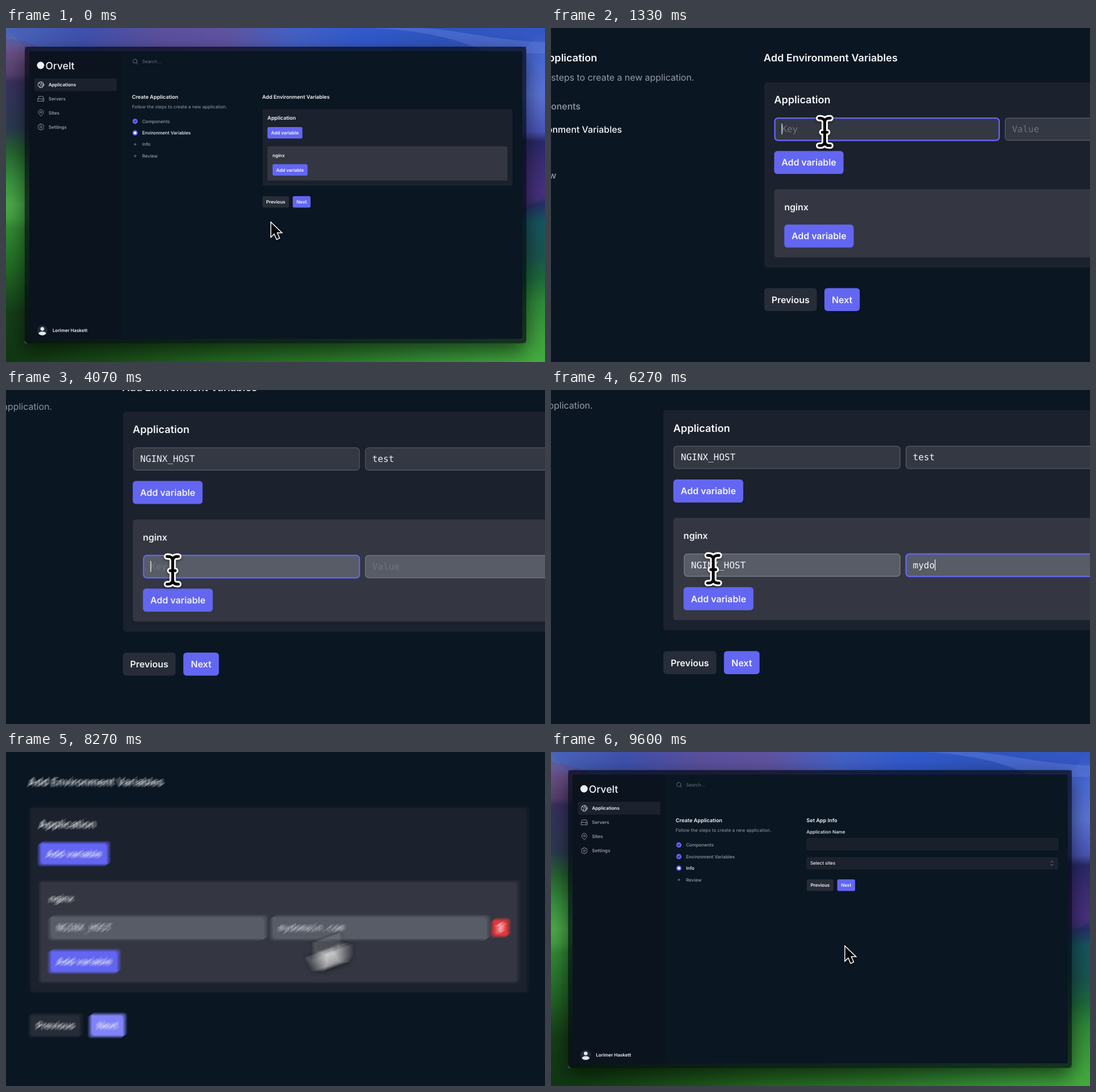
Recreate the animation shown at these times as an HTML page with a canvas. Size 950 by 590 pixels, loop 9.67 s.

```html
<!DOCTYPE html>
<html lang="en">
<head>
<meta charset="utf-8">
<title>Create application</title>
<style>
  html, body { margin: 0; width: 100%; height: 100%; overflow: hidden; background: #0a1622; }
  canvas { display: block; width: 950px; height: 590px; }
</style>
</head>
<body>
<canvas id="stage" width="950" height="590"></canvas>
<script>
const W = 950, H = 590, LOOP = 9670;
const SANS = 'Inter, sans-serif', MONO = '"DejaVu Sans Mono", monospace';
const INDIGO = '#6366f1', INDIGO_HOVER = '#8184f8', WHITE = '#f5f6f8', GREY = '#969ca7', PAGE = '#0a1622';

const APP_ROW = 860, NGINX_ROW = 3620, DELETE_CLICK = 7690, NEXT_CLICK = 8600, ROW = 29.6;

const makeCanvas = () => Object.assign(document.createElement('canvas'), { width: W, height: H });
const stage = document.getElementById('stage').getContext('2d');
const buffer = makeCanvas();
const g = buffer.getContext('2d');
g.textRendering = 'geometricPrecision';
g.lineCap = 'round';

// ---------- motion ----------

// Critically damped approach from 0 to 1.
const settle = x => x <= 0 ? 0 : 1 - (1 + x) * Math.exp(-x);

function follow(t, start, steps) {
  let value = start, previous = start;
  for (const [begin, target, rate] of steps) {
    value += (target - previous) * settle((t - begin) / 1000 * rate);
    previous = target;
  }
  return value;
}

function camera(t) {
  const scale = follow(t, 1, [[350, 2, 6.3], [8650, 1, 8]]);
  const focusX = follow(t, 529.3, [[3370, 706, 7], [7150, 940, 7], [8097, 720, 7]]);
  const focusY = follow(t, 191.5, [[3370, 251, 7], [7150, 135, 7], [8097, 295, 7]]);
  return { scale, x: focusX * (1 - scale), y: focusY * (1 - scale) };
}

const pointer = t => ({
  x: follow(t, 466, [[100, 505.7, 8], [3090, 496, 8], [7100, 876.5, 8], [8080, 518, 8]]),
  y: follow(t, 341, [[100, 187.4, 8], [3090, 283.8, 8], [7100, 190, 8], [8080, 340.5, 8]])
});

// Pointer shape over time, with the button under it.
const SHAPES = [
  [0, 'arrow'], [480, 'hand', 'addApp'], [APP_ROW, 'beam'], [3100, 'arrow'],
  [3420, 'hand', 'addNginx'], [NGINX_ROW, 'beam'], [7160, 'arrow'],
  [7480, 'hand', 'delete'], [7750, 'arrow'], [8160, 'hand', 'next'], [NEXT_CLICK, 'arrow']
];
const latest = (list, t) => list.filter(item => item[0] <= t).pop();

// Fields: focus time, first key time, ms per key.
const FIELDS = {
  appKey: { focus: APP_ROW, start: 1450, pace: 75, text: 'NGINX_HOST', hint: 'Key' },
  appValue: { focus: 2300, start: 2400, pace: 100, text: 'test', hint: 'Value' },
  nginxKey: { focus: NGINX_ROW, start: 4400, pace: 75, text: 'NGINX_HOST', hint: 'Key' },
  nginxValue: { focus: 5500, start: 6000, pace: 80, text: 'mydomain.com', hint: 'Value' }
};

function focusedField(t) {
  if (t >= DELETE_CLICK) return null;
  return Object.values(FIELDS).filter(f => f.focus <= t).pop();
}

// ---------- drawing helpers ----------

function box(x, y, w, h, r, fill, stroke, line = 0.6) {
  g.beginPath();
  g.roundRect(x, y, w, h, r);
  if (fill) { g.fillStyle = fill; g.fill(); }
  if (stroke) { g.strokeStyle = stroke; g.lineWidth = line; g.stroke(); }
}

function label(text, x, y, { size = 8, weight = 500, color = WHITE, family = SANS, align = 'left' } = {}) {
  g.font = `${weight} ${size}px ${family}`;
  g.fillStyle = color;
  g.textAlign = align;
  g.fillText(text, x, y + size * 0.36);
}

function disc(x, y, r, fill) {
  g.beginPath();
  g.arc(x, y, r, 0, Math.PI * 2);
  g.fillStyle = fill;
  g.fill();
}

function line(path, color, width = 0.9) {
  g.strokeStyle = color;
  g.lineWidth = width;
  g.stroke(path);
}

const heading = (text, x, y) => label(text, x, y, { size: 9.1, weight: 600 });

function button(text, x, y, w, fill) {
  box(x, y, w, 20.4, 2.8, fill);
  label(text, x + w / 2, y + 10.3, { weight: 600, align: 'center' });
}

function at(x, y, draw) {
  g.save();
  g.translate(x, y);
  draw();
  g.restore();
}

const ICONS = {
  globe: new Path2D('M5.2 0A5.2 5.2 0 1 1-5.2 0A5.2 5.2 0 1 1 5.2 0M-4-3L-1-2L0 0L-2 2L-1 5M1-5L1-2L4-1M5 1L2 1L2 4'),
  server: new Path2D('M-5.3 0L-3.6-4.3H3.6L5.3 0V4.3H-5.3ZM-5.3 0H5.3M2 2.2H3.6'),
  pin: new Path2D('M0 5.6C-3 2.5-4.5 1-4.5-1.2A4.5 4.5 0 0 1 4.5-1.2C4.5 1 3 2.5 0 5.6M1.6-1.2A1.6 1.6 0 1 1-1.6-1.2A1.6 1.6 0 1 1 1.6-1.2'),
  gear: new Path2D('M-1.2-5.3H1.2L1.7-3.8L3.9-4L5.2-1.6L4 0L5.2 1.6L3.9 4L1.7 3.8L1.2 5.3H-1.2L-1.7 3.8L-3.9 4L-5.2 1.6L-4 0L-5.2-1.6L-3.9-4L-1.7-3.8ZM1.7 0A1.7 1.7 0 1 1-1.7 0A1.7 1.7 0 1 1 1.7 0'),
  search: new Path2D('M3-.7A3.6 3.6 0 1 1-4.2-.7A3.6 3.6 0 1 1 3-.7M2 2L4.6 4.6'),
  check: new Path2D('M-1.9.1L-.6 1.5L1.9-1.6'),
  chevrons: new Path2D('M-2-2L0-4L2-2M-2 2L0 4L2 2'),
  trash: new Path2D('M-3-2.5H3M-1-3.5H1M-2.3-2.5L-1.9 3.5H1.9L2.3-2.5M-.7-1V2M.7-1V2')
};

const icon = (name, x, y, color, width) => at(x, y, () => line(ICONS[name], color, width));

// ---------- wallpaper ----------

const wallpaper = (() => {
  const canvas = makeCanvas(), c = canvas.getContext('2d');
  const strip = (points, x1, y1, stops) => {
    const gradient = c.createLinearGradient(0, 0, x1, y1);
    stops.split(' ').forEach(stop => {
      const [position, color] = stop.split('#');
      gradient.addColorStop(position / 100, '#' + color);
    });
    c.fillStyle = gradient;
    c.fill(new Path2D(points));
  };
  strip('M0 0H475V590H0Z', 0, H, '0#4a64b8 5#5768b2 8#654d82 14#57416f 16#38315f 30#2a3a50 37#25652f 46#3a9440 53#4cab49 57#43a042 60#328a34 72#226a26 85#153f18 100#103612');
  strip('M475 0H950V590H475Z', 0, H, '0#2f55c0 10#4a6ad4 20#5b74d6 31#4a55b5 34#2a2968 41#3a2c74 49#44307c 53#253066 58#17555f 68#1a5550 75#1c6a3c 82#2f8a38 92#3fa03e 100#45ad40');
  strip('M0 0H950L910 42H40Z', W, 0, '0#4a64b8 14#3e50ac 28#5a4f9c 41#5f53a0 53#4460c4 66#3159cc 80#2f55bd 100#3557c4');
  strip('M0 590L40 548H910L950 590Z', W, 0, '0#103612 20#1a5019 40#256a22 60#2c7c2a 80#38953a 100#45ad40');
  c.globalAlpha = 0.45;
  strip('M640 0C740 4 800 20 850 45H950V25C850 22 790 0 720 0Z', W, 0, '0#5577dd 100#6680e0');
  strip('M0 18C30 22 60 32 90 48H0Z', 100, 0, '0#724a78 100#4a3c80');
  strip('M900 200C925 210 940 230 950 245V300C930 310 915 316 900 318Z', 0, H, '30#2a2968 55#563488');
  c.globalAlpha = 1;
  c.shadowColor = 'rgba(0,0,0,.6)';
  c.shadowBlur = 34;
  c.shadowOffsetY = 14;
  c.save();
  c.beginPath();
  c.rect(0, 0, W, H);
  c.roundRect(33, 33, 884, 524, 7);
  c.clip('evenodd');
  c.fillRect(33, 33, 884, 524);
  c.restore();
  c.shadowColor = 'transparent';
  c.fillStyle = 'rgba(5,10,20,.74)';
  c.beginPath();
  c.roundRect(33, 33, 884, 524, 7);
  c.fill();
  return canvas;
})();

// ---------- interface ----------

function sidebar() {
  box(41, 41, 163, 508, [3, 0, 0, 3], '#0b131f');
  g.fillStyle = '#131c29';
  g.fillRect(204, 77, 706, 0.7);
  g.fillRect(203.6, 41, 0.5, 508);
  disc(61, 66, 6.4, '#eef0f3');
  label('Orvelt', 69.5, 66.2, { size: 17.6 });
  box(50, 89, 145, 22.5, 3, '#1b222e');
  [['globe', 'Applications'], ['server', 'Servers'], ['pin', 'Sites'], ['gear', 'Settings']].forEach(([name, text], i) => {
    const y = 100.2 + i * 24.9, active = i === 0;
    icon(name, 61.5, y, active ? '#e4e6ea' : GREY);
    label(text, 75, y, { weight: 600, color: active ? WHITE : GREY });
  });
  disc(64, 534, 9, '#222a37');
  g.save();
  g.beginPath();
  g.arc(64, 534, 9, 0, 7);
  g.clip();
  disc(64, 531.5, 3.3, '#e5e7eb');
  g.beginPath();
  g.ellipse(64, 541, 7.2, 4.8, 0, 0, 7);
  g.fill();
  g.restore();
  label('Lorimer Haskett', 82, 534, { weight: 600 });
  icon('search', 228, 59.3, '#727985');
  label('Search...', 240, 59.3, { weight: 400, color: '#6b7280' });
}

function progress(current) {
  heading('Create Application', 222, 121.7);
  label('Follow the steps to create a new application.', 222, 139, { weight: 400, color: GREY });
  ['Components', 'Environment Variables', 'Info', 'Review'].forEach((text, i) => {
    const y = 164.8 + i * 20.4;
    if (i > current) disc(227.5, y, 2.1, '#4e5664');
    else {
      disc(227.5, y, 4.6, INDIGO);
      if (i === current) disc(227.5, y, 2.3, '#fff');
      else icon('check', 227.5, y, PAGE, 1);
    }
    label(text, 240, y, { color: i === current ? WHITE : GREY });
  });
}

function input(field, x, y, w, nested, t) {
  const focused = focusedField(t) === field;
  const count = Math.max(0, Math.min(field.text.length, Math.floor((t - field.start) / field.pace) + 1));
  const shown = field.text.slice(0, count);
  const fill = nested ? '#575c66' : '#343843';
  box(x + 0.4, y + 0.3, w - 0.8, 19.8, 2.8, fill, focused ? INDIGO : nested ? '#7e838c' : '#5a606b', focused ? 1.2 : 0.6);
  const hintColor = nested ? '#737983' : '#6d727c';
  label(shown || field.hint, x + 6.4, y + 9.9, { weight: 400, family: MONO, color: shown ? WHITE : hintColor });
  if (!focused) return;
  const lastKey = count ? field.start + (count - 1) * field.pace : field.focus;
  if ((t - lastKey) % 1000 < 500) {
    g.fillStyle = '#fff';
    g.fillRect(x + 6.4 + g.measureText(shown).width, y + 5.2, 0.6, 9.6);
  }
}

function variableRow(key, value, x, right, y, nested, t) {
  input(key, x, y, 661 - x, nested, t);
  input(value, 665.5, y, right - 18 - 665.5, nested, t);
  box(right - 15, y + 2.4, 15, 15.4, 2.8, '#e5383e');
  icon('trash', right - 7.5, y + 10.1, '#fff', 0.8);
}

function variablesPage(t, hovered) {
  const fill = name => hovered === name ? INDIGO_HOVER : INDIGO;
  const appRow = t >= APP_ROW && t < DELETE_CLICK, nginxRow = t >= NGINX_ROW;
  const shift = appRow ? ROW : 0, shift2 = shift + (nginxRow ? ROW : 0);
  heading('Add Environment Variables', 451.5, 121.7);
  box(452, 143.3, 440.7, 135.2 + shift2, 2.8, '#1b212d');
  heading('Application', 460.8, 159);
  if (appRow) variableRow(FIELDS.appKey, FIELDS.appValue, 461, 884, 174.9, false, t);
  button('Add variable', 460.8, 174.9 + shift, 61.6, fill('addApp'));
  box(460.8, 208.9 + shift, 423, 60.7 + shift2 - shift, 2.8, '#343741');
  label('nginx', 469.8, 224.7 + shift, { weight: 600 });
  if (nginxRow) variableRow(FIELDS.nginxKey, FIELDS.nginxValue, 470, 875, 240.4 + shift, true, t);
  button('Add variable', 469.8, 240.4 + shift2, 61.6, fill('addNginx'));
  pageButtons(296.9 + shift2, fill('next'));
}

function pageButtons(y, nextFill) {
  button('Previous', 452, y, 46.7, '#272d38');
  button('Next', 505.4, y, 31.4, nextFill);
}

function infoPage() {
  heading('Set App Info', 451.5, 121.7);
  label('Application Name', 451.5, 141.3, { weight: 500 });
  box(451.8, 153.2, 441, 20, 2.8, '#19202b', '#2a313d');
  box(451.8, 186.9, 441, 20.2, 2.8, '#1b212d', '#262d39');
  label('Select sites', 458, 197);
  icon('chevrons', 882, 197, '#a3a8b2', 0.8);
  pageButtons(225.3, INDIGO);
}

// ---------- pointer shapes ----------

const ARROW = new Path2D('M1.5 3.6V27L7 21.6L11.3 31.6L15.3 29.9L11 20H18.6Z');
const BEAM = new Path2D('M-5-12.2H-4C-1.4-12.2 0-10.8 0-8.4V8.4C0 10.8-1.4 12.2-4 12.2H-5M5-12.2H4C1.4-12.2 0-10.8 0-8.4M0 8.4C0 10.8 1.4 12.2 4 12.2H5M-2.2.3H2.2');
const HAND = new Path2D('M-2 2.5C-2 .2 1.7 .2 1.7 2.5V10C2 8.4 5 8.4 5.2 10.4C6 9 8.4 9 8.6 11.4C9.6 10.4 12 10.8 12 13V18C12 22 9.5 26 8.5 27H-1.5C-3 24-6 20-8 16.5C-9 14-6.5 13-5 14.5L-2 18Z');

function drawPointer(shape, { x, y }) {
  at(x, y, () => {
    g.shadowColor = 'rgba(0,0,0,.4)';
    g.shadowBlur = 4;
    g.shadowOffsetY = 2;
    if (shape === 'beam') {
      line(BEAM, '#fff', 5.6);
      g.shadowColor = 'transparent';
      line(BEAM, '#000', 2.5);
    } else {
      const hand = shape === 'hand';
      line(hand ? HAND : ARROW, hand ? '#111' : '#fff', hand ? 2.2 : 3);
      g.shadowColor = 'transparent';
      g.fillStyle = hand ? '#fff' : '#000';
      g.fill(hand ? HAND : ARROW);
    }
  });
}

// ---------- frames ----------

function drawScene(t, cam, tip) {
  const [, shape, hovered] = latest(SHAPES, t);
  g.setTransform(cam.scale, 0, 0, cam.scale, cam.x, cam.y);
  g.drawImage(wallpaper, 0, 0);
  box(41, 41, 869, 508, 3, PAGE);
  sidebar();
  const info = t >= NEXT_CLICK;
  progress(info ? 2 : 1);
  if (info) infoPage(); else variablesPage(t, hovered);
  drawPointer(shape, tip);
}

// Camera and pointer have separate shutter lengths, in ms.
const CAMERA_SHUTTER = 16, POINTER_SHUTTER = 30;

function isMoving(t) {
  const a = camera(t - 8), b = camera(t + 8), p = pointer(t - 15), q = pointer(t + 15);
  return Math.hypot(a.x - b.x, a.y - b.y) + Math.hypot(p.x - q.x, p.y - q.y) > 0.8;
}

function render(t) {
  const samples = isMoving(t) ? 16 : 1;
  for (let i = 0; i < samples; i++) {
    const u = (i + 0.5) / samples - 0.5;
    drawScene(t, camera(t + u * CAMERA_SHUTTER), pointer(t + u * POINTER_SHUTTER));
    stage.globalAlpha = 1 / (i + 1);
    stage.drawImage(buffer, 0, 0);
  }
}

const began = performance.now();
function tick() {
  render((performance.now() - began) % LOOP);
  requestAnimationFrame(tick);
}
tick();
</script>
</body>
</html>
```
